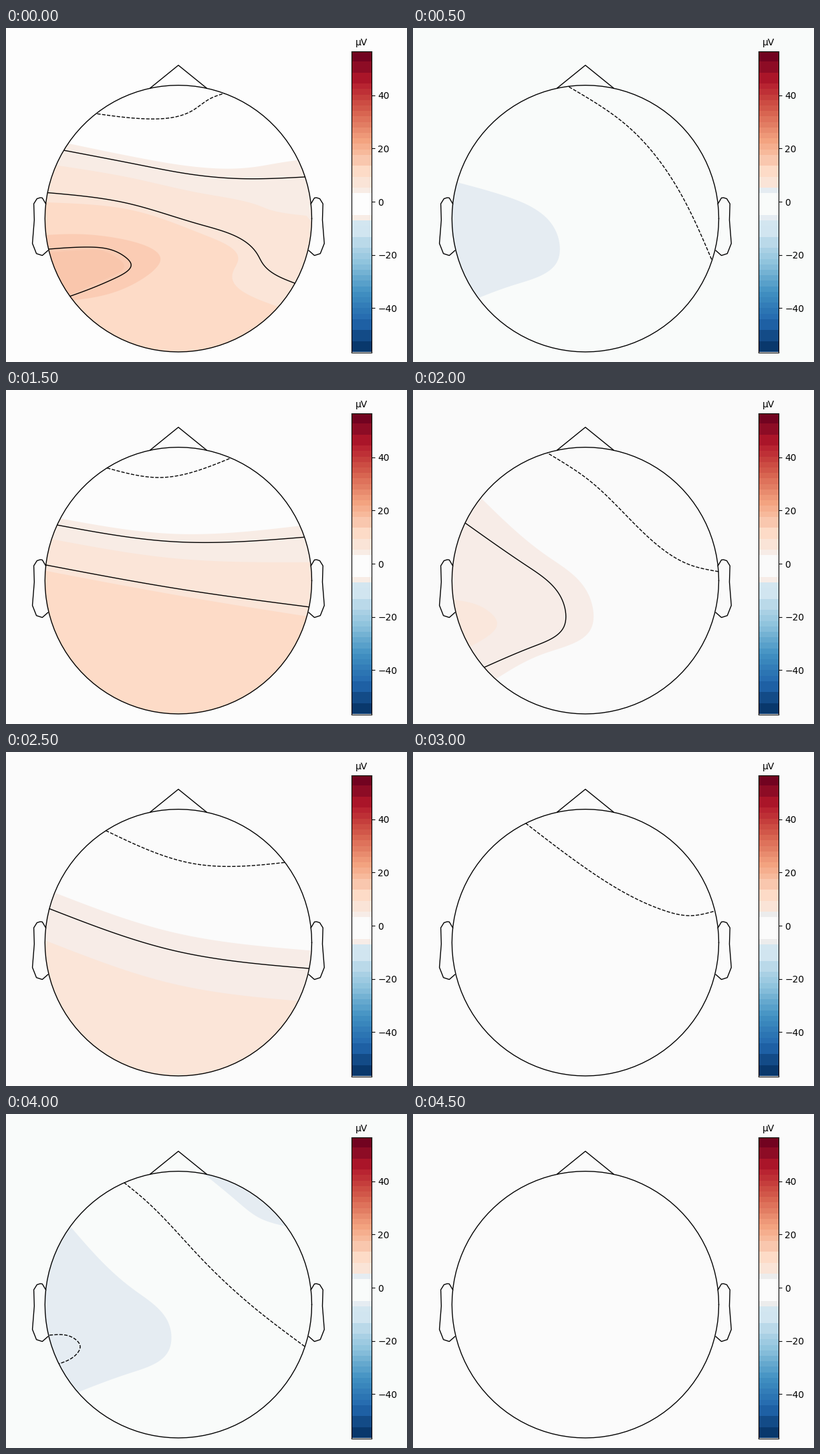
Write a matplotlib script that moves like this. It is 600 by 500 pixels and loops after 5000 ms.

```python
import numpy as np
import matplotlib.pyplot as plt
from matplotlib.animation import FuncAnimation
from matplotlib.colors import to_rgb
from matplotlib.patches import Circle, Polygon

W, H, DPI = 600, 500, 100
CX, CY, R = 257.9, 285.3, 199.6
STEP_MS = 500
LEVELS = 55
V_MAX = 56.66

# Corners that close an open boundary outside the head
CORNERS = {
    "S": [(700, 600), (-100, 600)],
    "W": [(-100, 600), (-100, 0)],
    "NW": [(0, 0)],
    "NE": [(600, 0)],
    "SE": [(700, 600)],
}

fig = plt.figure(figsize=(W / DPI, H / DPI), dpi=DPI)
ax = fig.add_axes([0, 0, 1, 1])
ax.set_xlim(0, W)
ax.set_ylim(H, 0)
ax.axis("off")
head = Circle((CX, CY), R, transform=ax.transData)
cmap = plt.get_cmap("RdBu_r")


def shade(level):
    """Colour of a step counted from the middle of the scale."""
    return cmap(0.5 + level / LEVELS)[:3]


def bar_shade(k):
    """Steps share a colour in pairs near the middle and the ends."""
    n = abs(k)
    if n < 9:
        n = (n - 1) // 2 * 2 + 1.5
    elif n > 21:
        n = n // 2 * 2 + 0.5
    return shade(n) if k > 0 else shade(-max(n, 5))


def curve(*keys, samples=90, extend=8):
    """Natural cubic spline through the key points, lengthened at both ends."""
    p = np.array(keys, float)
    n = len(p)
    t = np.r_[0, np.cumsum(np.hypot(*np.diff(p, axis=0).T))]
    h = np.diff(t)
    slope = np.diff(p, axis=0) / h[:, None]
    lhs, rhs = np.eye(n), np.zeros_like(p)
    for i in range(1, n - 1):
        lhs[i, i - 1:i + 2] = h[i - 1], 2 * (h[i - 1] + h[i]), h[i]
        rhs[i] = 6 * (slope[i] - slope[i - 1])
    m = np.linalg.solve(lhs, rhs)
    s = np.linspace(0, t[-1], samples)
    i = np.clip(np.searchsorted(t, s) - 1, 0, n - 2)
    a, b, w = (v[:, None] for v in (t[i + 1] - s, s - t[i], h[i]))
    q = ((m[i] * a**3 + m[i + 1] * b**3) / (6 * w)
         + (p[i] / w - m[i] * w / 6) * a + (p[i + 1] / w - m[i + 1] * w / 6) * b)
    k = extend / s[1]
    return np.vstack([q[0] + (q[0] - q[1]) * k, q, q[-1] + (q[-1] - q[-2]) * k])


def between(a, b, k):
    return a + (b - a) * k


class Scene:
    def __init__(self, bg, tint):
        self.bg, self.tint = bg, tint
        self.art = []
        self.bar = [[to_rgb(bg) if -2 <= k <= 1 else
                     to_rgb(tint) if k in (2, -3) else bar_shade(k)]
                    for k in range(-(LEVELS // 2), LEVELS // 2 + 1)]

    def fill(self, color, side, path):
        pts = np.vstack([path, CORNERS[side]])
        patch = ax.add_patch(Polygon(pts, fc=color, lw=0, zorder=3))
        patch.set_clip_path(head)
        self.art.append(patch)

    def lines(self, *paths, style="-"):
        for path in paths:
            ln, = ax.plot(*path.T, color="k", lw=1, zorder=4, ls=style)
            ln.set_clip_path(head)
            self.art.append(ln)

    def dashes(self, *paths):
        self.lines(*paths, style="--")

    def show(self, on):
        for a in self.art:
            a.set_visible(on)


def draw_head():
    a = np.linspace(0, 2 * np.pi, 101)
    ear_x = np.array([.497, .510, .518, .5299, .5419, .54, .547, .532, .510, .489])
    ear_y = np.array([.0555, .0775, .0783, .0746, .0555, -.0055, -.0932, -.1313,
                      -.1384, -.1199])
    style = dict(color="k", lw=1, zorder=5)
    ax.plot(CX + R * np.cos(a), CY + R * np.sin(a), **style)
    ax.plot([CX - 42, CX, CX + 42], [CY - 195.5, CY - 1.15 * R, CY - 195.5], **style)
    for side in (-1, 1):
        ax.plot(CX + side * 2 * R * ear_x, CY - 2 * R * ear_y, **style)


def make_bar():
    cax = fig.add_axes([516.5 / W, 14.5 / H, 30 / W, 451 / H])
    image = cax.imshow(np.zeros((LEVELS, 1, 3)), origin="lower", aspect="auto",
                       interpolation="nearest", extent=(0, 1, -V_MAX, V_MAX))
    cax.set_xticks([])
    cax.set_yticks(range(-40, 41, 20))
    cax.yaxis.tick_right()
    cax.set_title("\u00b5V", size=10)
    return image


def slope_scene():
    s = Scene("#fdfdfd", "#f8ece5")
    top = curve((86, 183), (200, 205), (270, 218), (350, 225.5), (447, 223))
    mid = curve((62, 246.5), (180, 262), (290, 294), (377, 340), (383, 351), (432, 382))
    low = curve((64, 331), (125, 328), (176, 341), (187, 353), (160, 376), (96, 401.5))
    notch = curve((60, 261), (180, 271), (300, 311), (347, 349), (340, 364), (409, 418))
    lobe = curve((60, 310), (150, 312), (231, 348), (195, 381), (98, 408))
    s.fill(s.tint, "S", between(top, mid, -0.17))
    s.fill(shade(3.5), "S", between(top, mid, 0.36))
    s.fill(shade(5.5), "S", notch)
    s.fill(shade(7), "W", lobe)
    s.fill(shade(7.6), "W", between(low, lobe, -0.25))
    s.lines(top, mid, low)
    s.dashes(curve((137, 128.5), (210, 136), (280, 123), (305, 106), (326, 98)))
    return s


def cool_left():
    s = Scene("#f9fbfa", "#e5ecf2")
    s.fill(s.tint, "W", curve((62, 230), (130, 249), (215, 307), (217, 347),
                              (150, 385), (98, 404)))
    s.dashes(curve((234, 88.5), (320, 146), (405, 256), (447, 347)))
    return s


def hot_back():
    s = Scene("#fdfdfd", "#f1ece9")
    zero = curve((91, 177), (150, 173), (250, 142), (270, 113), (264, 94), (268, 87))
    iso = [
        curve((70, 217), (110, 218), (215, 200), (285, 177), (322, 143), (355, 111)),
        curve((60, 260.5), (95, 261), (200, 244), (300, 219), (357, 180), (406, 153)),
        curve((60, 313), (160, 293), (325, 264), (380, 239), (444, 215)),
        curve((79, 372), (150, 344), (260, 321), (380, 307), (410, 299), (458, 294)),
    ]
    pit = curve((196, 96), (197, 108), (175, 127), (125, 136))
    rim = curve((213, 90), (226, 109), (175, 146), (106, 154))
    s.fill(s.tint, "NW", rim)
    s.fill("#d9e6ef", "NW", between(pit, rim, -0.1))
    s.fill(s.tint, "S", between(zero, iso[0], 0.88))
    # Height of each boundary counted in line spacings, with its colour step
    for height, level in [(0.36, 3.5), (1.14, 5.5), (1.77, 7), (2.05, 8),
                          (2.58, 9), (2.83, 9.8)]:
        i = int(height)
        s.fill(shade(level), "S", between(iso[i], iso[i + 1], height - i))
    s.fill(shade(10.6), "SE", curve((455, 327), (320, 335), (220, 355), (172, 380),
                                    (193, 404), (184, 438), (215, 485)))
    s.fill(shade(11.6), "SE", curve((428, 389), (375, 391), (338, 415), (393, 432)))
    s.lines(*iso)
    s.dashes(pit, zero)
    return s


def warm_back():
    s = Scene("#fcfcfc", "#f8ece5")
    top = curve((76, 202), (250, 227), (450, 220))
    mid = curve((60, 262), (260, 298), (455, 325))
    s.fill(s.tint, "S", between(top, mid, -0.17))
    s.fill(shade(3.5), "S", between(top, mid, 0.36))
    s.fill(shade(5.5), "S", between(top, mid, 1.14))
    s.lines(top, mid)
    s.dashes(curve((152, 117), (230, 131), (336, 102)))
    return s


def cream_left():
    s = Scene("#fafafa", "#f7ece7")
    s.fill(s.tint, "W", curve((100, 160), (200, 248), (262, 305), (267, 356),
                              (195, 395), (125, 432)))
    s.fill(shade(3.2), "W", curve((60, 314), (110, 329), (125, 345), (82, 386)))
    s.lines(curve((78, 199), (170, 263), (224, 316), (226, 354), (180, 384), (107, 415)))
    s.dashes(curve((204, 96), (262, 134), (355, 223), (415, 262), (458, 272)))
    return s


def cream_back():
    s = Scene("#fbfbfb", "#f7ece7")
    line = curve((66, 235), (250, 297), (453, 324))
    s.fill(s.tint, "S", line - (0, 27))
    s.fill(shade(3.5), "S", line + (0, 50))
    s.lines(line)
    s.dashes(curve((150, 118), (280, 167), (429, 164)))
    return s


def near_flat():
    s = Scene("#fbfbfb", "#ececec")
    s.dashes(curve((169, 107), (260, 175), (375, 237), (415, 245), (452, 238)))
    return s


def pale_left():
    s = Scene("#fbfbfb", "#f7ece7")
    s.fill(s.tint, "W", curve((88, 180), (200, 272), (250, 335), (210, 381), (135, 443)))
    s.lines(curve((70, 226), (150, 276), (198, 338), (98, 405)))
    s.dashes(curve((190, 98), (335, 223), (457, 279)))
    return s


def cool_sides():
    s = Scene("#f9fbfa", "#e5ecf2")
    s.fill(s.tint, "W", curve((96, 168), (190, 262), (245, 318), (244, 353),
                              (185, 388), (109, 416)))
    s.fill(s.tint, "NE", curve((299, 92), (345, 130), (380, 156), (418, 168)))
    s.dashes(curve((177, 103), (205, 126), (290, 214), (375, 293), (447, 348)),
             curve((66, 331), (102, 336), (111, 348), (105, 360), (79, 374)))
    return s


def flat():
    return Scene("#fbfbfb", "#ececec")


draw_head()
bar = make_bar()
scenes = [make() for make in (slope_scene, cool_left, hot_back, warm_back, cream_left,
                              cream_back, near_flat, pale_left, cool_sides, flat)]


def update(i):
    for k, scene in enumerate(scenes):
        scene.show(k == i)
    bar.set_data(np.array(scenes[i].bar))
    fig.set_facecolor(scenes[i].bg)
    return []


anim = FuncAnimation(fig, update, frames=len(scenes), init_func=lambda: update(0),
                     interval=STEP_MS, repeat=True, repeat_delay=0, blit=False)
plt.show()
```
